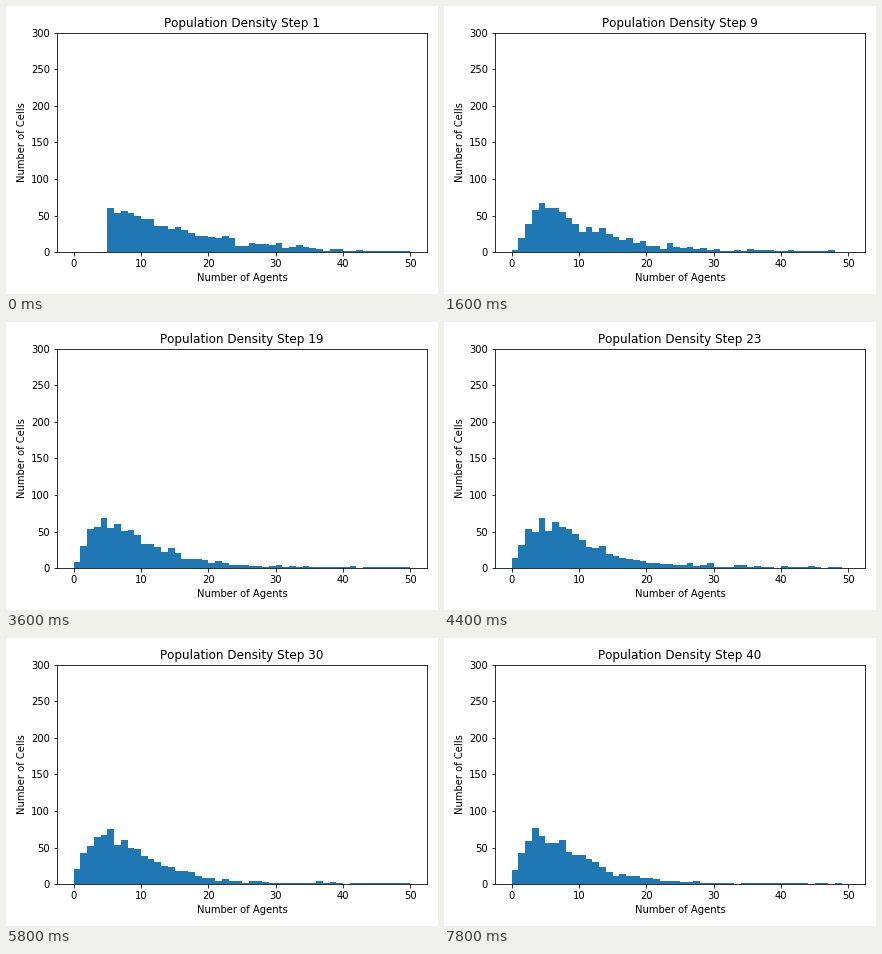
These frames come from a looping animation (432x288 px, 8 s). A matplotlib script:

```python
import matplotlib.pyplot as plt
import numpy as np
from matplotlib.animation import FuncAnimation

plt.rcParams["text.kerning_factor"] = 6  # whole-pixel kerning

STEPS = 40
STEP_MS = 200
SETTLED = 9  # step at which the sharp starting edge has dissolved
AGENTS = np.arange(50)

# Mean cell counts at a few bins, once settled and at the end.
KNOTS = [0, 1, 2, 3.5, 5, 8, 11, 15, 20, 30, 49]
EARLY = [4, 18, 46, 59, 63, 49, 29, 20, 9, 4, 0.8]
LATE = [23, 48, 63, 77, 63, 48, 34, 15, 6, 1.8, 0.3]


def start_mean():
    """Every cell starts with at least five agents; crowded cells are rare."""
    decay = np.exp(-(np.maximum(AGENTS - 5, 0) / 15) ** 1.25)
    return np.where(AGENTS >= 5, 58 * decay, 0)


def spread_mean(u):
    """Mean profile after settling, with u running from 0 to 1."""
    early = np.interp(AGENTS, KNOTS, EARLY)
    late = np.interp(AGENTS, KNOTS, LATE)
    return early + u * (late - early)


def counts_at(step):
    if step < SETTLED:
        u = ((step - 1) / (SETTLED - 1)) ** 0.55
        mean = (1 - u) * start_mean() + u * spread_mean(0)
    else:
        mean = spread_mean((step - SETTLED) / (STEPS - SETTLED))
    noise = np.random.default_rng(step).normal(size=AGENTS.size)
    return np.maximum(0, np.round(mean + 0.7 * np.sqrt(mean) * noise))


fig, ax = plt.subplots(figsize=(6, 4), dpi=72)
bars = ax.bar(AGENTS, counts_at(1), width=1, align="edge", color="C0")
ax.set_xlim(-2.5, 52.5)
ax.set_ylim(0, 300)
ax.set_xlabel("Number of Agents")
ax.set_ylabel("Number of Cells")
title = ax.set_title("Population Density Step 1")
fig.tight_layout()


def draw(i):
    step = i + 1
    for bar, count in zip(bars, counts_at(step)):
        bar.set_height(count)
    title.set_text(f"Population Density Step {step}")
    return [*bars, title]


anim = FuncAnimation(fig, draw, frames=STEPS, interval=STEP_MS,
                     repeat=True, repeat_delay=0, blit=False)
plt.show()
```
